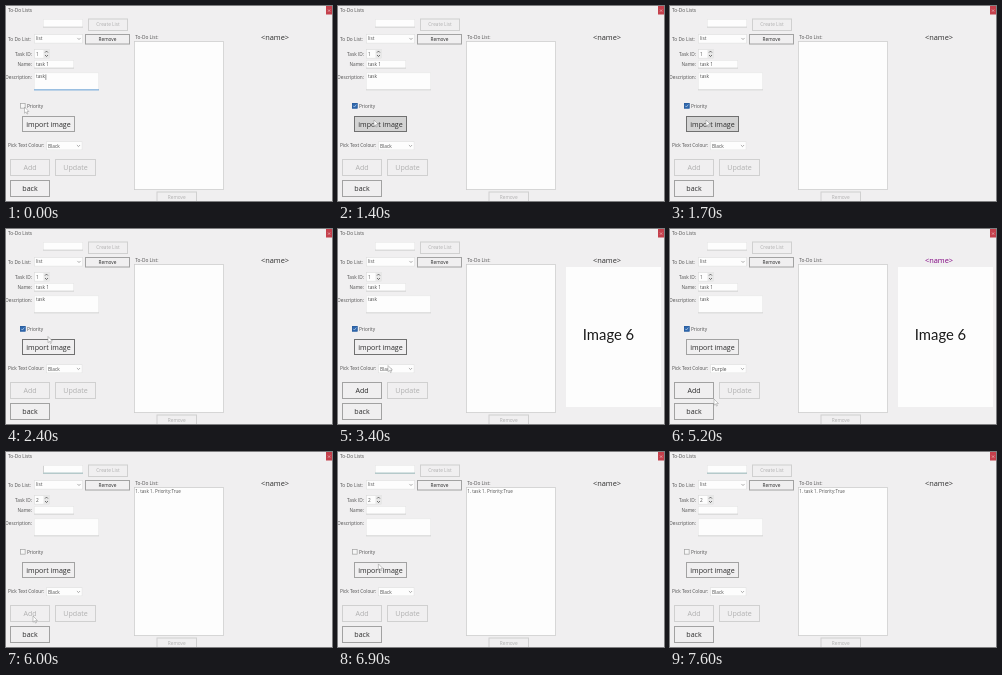
Animation, 326 px wide and 195 px high, one loop 8 s. Source, as an HTML page with a canvas:

```html
<!DOCTYPE html>
<html lang="en">
<head>
<meta charset="utf-8">
<title>To-Do Lists</title>
<style>
  html, body { margin: 0; width: 100%; height: 100%; overflow: hidden; background: #f0eff0; }
  canvas { display: block; width: 326px; height: 195px; }
</style>
</head>
<body>
<canvas id="stage"></canvas>
<script>
const W = 326, H = 195, LOOP = 8000, STEP = 100;
const UI = '"Open Sans", "Noto Sans", sans-serif';
const BG = '#f0eff0', PAPER = '#fdfdfd', INK = '#2c2c2c', SOFT = '#505050', FAINT = '#b0b0b0';
const EDGE = '#a2a2a2', PALE = '#d0d0d0', ACCENT = '#1f78c4';
const COLOURS = ['Black', 'White', 'Orange', 'Green', 'Purple', 'Blue', 'Brown'];

// Moments at which the form changes state.
const AT = { check: 100, importHover: 1200, importDone: 2400, image: 2500, open: 3500,
             pick: 4500, addHover: 5400, added: 6000, textField: 7200 };
const BLINK = 530;

// Pointer stops: time, x, y.
const PATH = [
  [0, 18.5, 101], [800, 18.5, 101], [1300, 36, 114], [1700, 36, 114],
  [2200, 42, 107.5], [2500, 42, 107.5], [3100, 50, 136.5], [3500, 50, 136.5],
  [4200, 54, 174], [4500, 54, 174], [5100, 44, 170], [5200, 44, 170],
  [5700, 27, 164], [6700, 27, 164], [7200, 65, 16]
];

const canvas = document.getElementById('stage');
const ctx = canvas.getContext('2d');
const scale = window.devicePixelRatio || 1;
canvas.width = W * scale;
canvas.height = H * scale;

function fill(x, y, w, h, colour) {
  ctx.fillStyle = colour;
  ctx.fillRect(x, y, w, h);
}

function frame(x, y, w, h, colour, width = 1) {
  ctx.strokeStyle = colour;
  ctx.lineWidth = width;
  ctx.strokeRect(x + width / 2, y + width / 2, w - width, h - width);
}

function text(str, x, y, { size = 4.75, colour = SOFT, align = 'left', font = UI } = {}) {
  ctx.font = `${size}px ${font}`;
  ctx.fillStyle = colour;
  ctx.textAlign = align;
  ctx.fillText(str, x, y);
}

function line(points, colour, width) {
  ctx.beginPath();
  points.forEach(([x, y]) => ctx.lineTo(x, y));
  ctx.strokeStyle = colour;
  ctx.lineWidth = width;
  ctx.stroke();
}

function button(label, x, y, w, h, { size = 4.75, enabled = true, hover = false, focus = false } = {}) {
  fill(x, y, w, h, hover ? '#d3d3d3' : BG);
  frame(x, y, w, h, focus ? '#707070' : enabled ? EDGE : PALE);
  text(label, x + w / 2, y + h / 2 + size * 0.36,
       { size, colour: enabled ? INK : FAINT, align: 'center' });
}

function field(x, y, w, h, value, underline = '#cacaca') {
  fill(x, y, w, h, PAPER);
  frame(x, y, w, h, '#e6e6e6', 0.6);
  fill(x, y + h - 0.8, w, 0.8, underline);
  text(value, x + 2, y + 5.7);
}

function chevron(x, y) {
  line([[x - 1.6, y - 0.8], [x, y + 0.8], [x + 1.6, y - 0.8]], '#777', 0.6);
}

function combo(x, y, w, h, value, open) {
  fill(x, y, w, h, open ? '#c6ced6' : PAPER);
  frame(x, y, w, h, open ? '#6a9cc8' : '#e0e0e0', 0.7);
  text(value, x + 2, y + 6.4);
  chevron(x + w - 4, y + h / 2);
}

function spinner(value) {
  fill(28, 43, 16, 9.5, PAPER);
  frame(28, 43, 16, 9.5, '#d8d8d8', 0.6);
  fill(37.5, 43.5, 6, 8.5, '#e8e8e8');
  for (const dir of [-1, 1]) {
    const y = 47.8 + dir * 2;
    line([[39.1, y - dir * 0.7], [40.5, y + dir * 0.7], [41.9, y - dir * 0.7]], '#555', 0.9);
  }
  text(value, 30, 50);
}

function checkbox(checked) {
  fill(14, 97, 5.5, 5.5, checked ? '#2f69b0' : '#f6f6f6');
  frame(14, 97, 5.5, 5.5, checked ? '#2a5c9c' : '#a0a0a0', 0.7);
  if (checked) line([[15.3, 99.8], [16.4, 101], [18.3, 98.6]], '#dce6f2', 0.6);
  text('Priority', 21, 101.6);
}

function dropdown(active) {
  const row = 6.85;
  fill(40, 144.5, 36.5, 48.5, PAPER);
  frame(40, 144.5, 36.5, 48.5, '#5c92c4', 0.8);
  COLOURS.forEach((name, i) => {
    const y = 144.8 + i * row;
    if (i === active) fill(40.7, y, 35.1, row, ACCENT);
    text(name, 41.6, y + 5, { colour: i === active ? '#dcebf8' : SOFT });
  });
}

function pointerAt(t) {
  const next = PATH.findIndex(stop => stop[0] > t);
  if (next < 0) return PATH[PATH.length - 1].slice(1);
  const [t0, x0, y0] = PATH[next - 1], [t1, x1, y1] = PATH[next];
  const p = (t - t0) / (t1 - t0), ease = p * p * (3 - 2 * p);
  return [x0 + (x1 - x0) * ease, y0 + (y1 - y0) * ease];
}

function pointer(x, y) {
  const shape = [[0, 0], [0, 6.2], [1.5, 4.9], [2.5, 7.1], [3.4, 6.7], [2.5, 4.6], [4.4, 4.5]];
  ctx.beginPath();
  shape.forEach(([dx, dy]) => ctx.lineTo(x + dx, y + dy));
  ctx.closePath();
  ctx.fillStyle = '#fff';
  ctx.fill();
  ctx.strokeStyle = '#8c8c8c';
  ctx.lineWidth = 0.5;
  ctx.stroke();
}

function header() {
  text('To-Do Lists', 2, 6);
  fill(320, 0, 6, 8.5, '#c4404c');
  line([[322, 3.5], [324.2, 5.7]], '#f4dcde', 0.5);
  line([[324.2, 3.5], [322, 5.7]], '#f4dcde', 0.5);
}

function draw(t) {
  const during = (from, to) => t >= from && t < to;
  const added = t >= AT.added;
  const hasImage = during(AT.image, AT.added);
  const open = during(AT.open, AT.pick);
  const picked = during(AT.pick, AT.added);
  const editing = t < AT.check;
  const [px, py] = pointerAt(t);

  ctx.setTransform(scale, 0, 0, scale, 0, 0);
  fill(0, 0, W, H, BG);
  header();

  field(37, 13, 40, 8.5, '', added ? '#7fa5a8' : undefined);
  if (added && Math.floor((t - AT.added) / BLINK) % 2 === 0) fill(37.3, 14, 0.5, 6.5, '#b0b0b0');
  button('Create List', 82, 12.5, 40, 12.5, { enabled: false });

  text('To Do List:', 2, 34.5);
  combo(28, 28, 49, 9.5, 'list', false);
  button('Remove', 79, 28, 45, 10.5);
  text('Task ID:', 26, 49.8, { align: 'right' });
  spinner(added ? '2' : '1');
  text('Name:', 26, 60, { align: 'right' });
  field(28, 54.3, 40, 8.2, added ? '' : 'task 1');
  text('Description:', 26, 72.5, { align: 'right' });
  field(28, 66.5, 65, 17.8, added ? '' : 'task', editing ? '#3f88cc' : undefined);
  if (editing) fill(39.6, 68.4, 0.6, 5.5, SOFT);

  checkbox(t >= AT.check && !added);
  button('import image', 16, 110, 53, 16, {
    size: 7.1,
    hover: during(AT.importHover, AT.importDone),
    focus: during(AT.importHover, AT.open)
  });

  text('Pick Text Colour:', 2, 141.2);
  combo(40, 135.3, 36.5, 9, picked ? 'Purple' : 'Black', open);
  button('Add', 4, 153, 40, 17, {
    size: 7.1, enabled: hasImage, hover: during(AT.addHover, AT.added)
  });
  button('Update', 49, 153, 41, 17, { size: 7.1, enabled: false });
  button('back', 4, 174, 40, 17, { size: 7.1 });

  text('To-Do List:', 129.3, 33.2);
  fill(128, 35, 90, 149, PAPER);
  frame(128, 35, 90, 149, '#cdcdcd', 0.8);
  if (added) text('1. task 1. Priority:True', 129.3, 41.2, { size: 4.5 });
  button('Remove', 150.5, 185.5, 40.5, 11, { enabled: false });

  text('<name>', 269, 34, { size: 7.4, align: 'center', colour: picked ? '#800080' : INK });
  if (hasImage) {
    fill(228, 38, 95, 140, PAPER);
    text('Image 6', 270.5, 111, {
      size: 14.8, align: 'center', colour: '#1a1a1a', font: 'Lato, sans-serif'
    });
  }

  if (open) {
    const row = Math.floor((py - 144.8) / 6.85);
    dropdown(Math.max(0, Math.min(row, COLOURS.length - 1)));
  }
  if (t < AT.textField) pointer(px, py);
}

const start = performance.now();
function tick() {
  const t = (performance.now() - start) % LOOP;
  draw(Math.floor(t / STEP) * STEP);
  requestAnimationFrame(tick);
}
tick();
</script>
</body>
</html>
```
